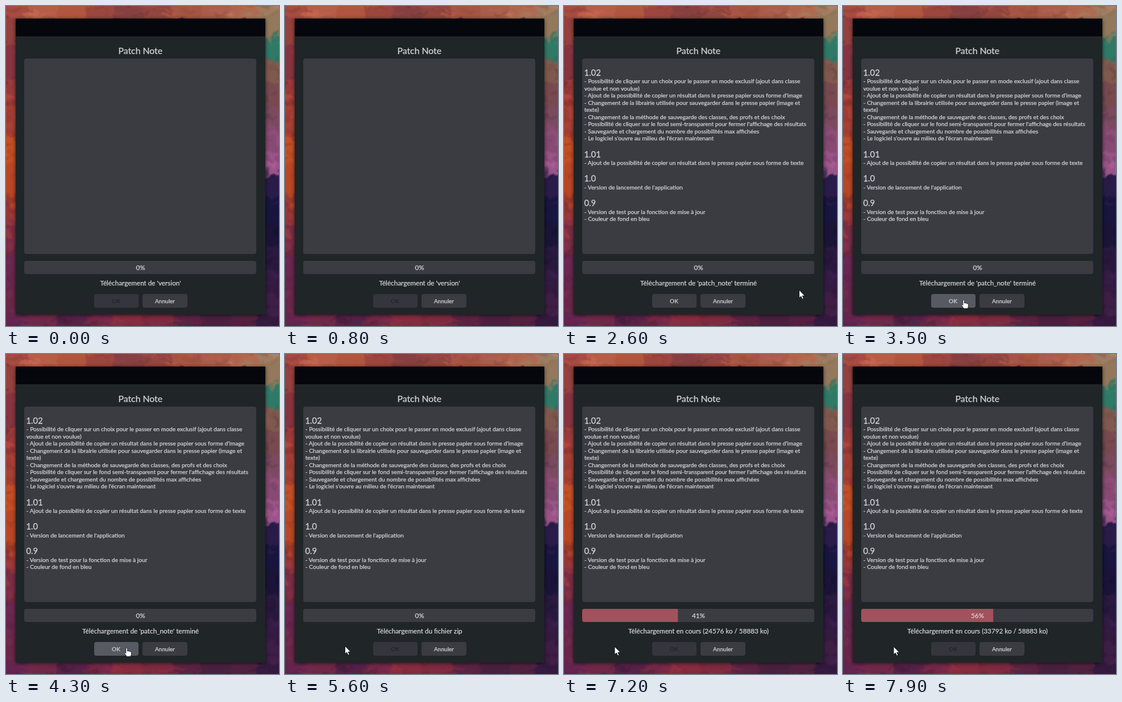
Write an HTML page that moves like this. It is 480x560 px and loops after 8000 ms.

```html
<!DOCTYPE html>
<html lang="fr">
<head>
<meta charset="utf-8">
<title>Patch Note</title>
<style>
  html, body { margin: 0; width: 100%; height: 100%; overflow: hidden; background: #5a2440; }
  svg { display: block; width: 480px; height: 560px; }
  filter { color-interpolation-filters: sRGB; }
  text { font-family: Lato, "Open Sans", sans-serif; fill: #d4d5d7; stroke: #d4d5d7; stroke-width: .25px; white-space: pre; }
  .mid { text-anchor: middle; }
  .title { font-size: 15.8px; }
  .label { font-size: 11.72px; }
  .head { font-size: 14.8px; }
  .body { font-size: 10.27px; }
  .btn { font-size: 10.1px; }
</style>
</head>
<body>
<svg viewBox="0 0 480 560" xmlns="http://www.w3.org/2000/svg">
  <defs>
    <filter id="paint" filterUnits="userSpaceOnUse" x="-20" y="-20" width="520" height="600">
      <feTurbulence type="fractalNoise" baseFrequency="0.06" numOctaves="3" seed="4"/>
      <feDisplacementMap in="SourceGraphic" scale="20" xChannelSelector="R" yChannelSelector="G"/>
      <feGaussianBlur stdDeviation=".8"/>
    </filter>
    <filter id="shadow" x="-5%" y="-5%" width="110%" height="110%">
      <feDropShadow dx="0" dy="1" stdDeviation="3" flood-color="#000" flood-opacity=".65"/>
    </filter>
    <clipPath id="barClip"><rect x="32" y="446" width="408" height="23" rx="4"/></clipPath>
  </defs>

  <g id="wall" filter="url(#paint)"></g>

  <g filter="url(#shadow)">
    <rect x="17" y="22" width="439" height="518" fill="#202528"/>
    <rect x="17" y="22" width="439" height="31" fill="#06070c"/>
  </g>

  <text class="mid title" x="236.3" y="84.3">Patch Note</text>
  <rect x="32" y="92" width="408" height="342" rx="4" fill="#3b3b42"/>
  <g id="notes"></g>

  <rect x="32" y="446" width="408" height="23" rx="4" fill="#3b3b42"/>
  <rect id="fill" x="32" y="446" height="23" fill="#a1525c" clip-path="url(#barClip)"/>
  <text id="percent" class="mid label" x="236.5" y="462"></text>
  <text id="status" class="mid label" x="236.5" y="489"></text>

  <rect id="okBox" x="155" y="504" width="78" height="24" rx="4"/>
  <text id="okText" class="mid btn" x="193.5" y="520">OK</text>
  <rect x="240" y="504" width="79" height="24" rx="4" fill="#3b3b42"/>
  <text class="mid btn" x="279.5" y="520">Annuler</text>

  <g id="cursor" stroke="#111" stroke-width=".9" fill="#fff" stroke-linejoin="round">
    <path id="arrow" d="M0 0V14L3.2 11L5.5 16L7.8 15L5.6 10.2H10Z"/>
    <path id="hand" d="M-.2 1.2Q1.5-.6 2.6 1.4V6Q4.4 4.8 5.2 6.3Q6.8 5.4 7.6 7Q9.6 6.6 9.6 8.6V11.5L8 15.5H1.5L-2.8 9.8Q-2.2 7.6-.2 9.4Z"/>
  </g>
</svg>
<script>
const LOOP = 8000;
const TOTAL = 58883;
const NS = 'http://www.w3.org/2000/svg';
const $ = id => document.getElementById(id);

function add(parent, tag, attrs, content) {
  const el = document.createElementNS(NS, tag);
  for (const key in attrs) el.setAttribute(key, attrs[key]);
  if (content) el.textContent = content;
  parent.appendChild(el);
  return el;
}

let seed = 7;
function random() {
  seed = (seed * 16807) % 2147483647;
  return seed / 2147483647;
}

// Wallpaper: painted strokes along the four visible edges
const edges = [
  { x: -15, y: -15, w: 510, h: 41,
    colors: ['#a84c42', '#b65d4a', '#b0553f', '#9c463e', '#86403f', '#93463f', '#a65443', '#a85c4b', '#b06a52', '#a07a5e'] },
  { x: -15, y: 532, w: 510, h: 43,
    colors: ['#642450', '#702848', '#552248', '#6d2643', '#872c3f', '#7c2a40', '#5a2342', '#48203f', '#50223f', '#33193d'] },
  { x: -15, y: 20, w: 37, h: 520,
    colors: ['#95413e', '#863540', '#993a3a', '#a84034', '#c44f26', '#b94726', '#963736', '#792d44', '#692750', '#682748'] },
  { x: 450, y: 12, w: 45, h: 528,
    colors: ['#94785c', '#2f7a66', '#80594e', '#784a50', '#7b4a5e', '#874a72', '#9a5488', '#2a1c4a', '#181540', '#1a1438', '#2a1a40', '#341c45', '#3e1e45'] }
];
const strokes = [];
for (const { x, y, w, h, colors } of edges) {
  const wide = w > h;
  const step = (wide ? w : h) / colors.length;
  const side = wide ? h : w;
  colors.forEach((fill, i) => add($('wall'), 'rect', wide
    ? { x: x + i * step, y, width: step + 1, height: side, fill }
    : { x, y: y + i * step, width: side, height: step + 1, fill }));
  for (let n = 0; n < 90; n++) {
    const u = random();
    const pick = Math.floor(u * colors.length + (random() - .5) * 1.2);
    const fill = colors[Math.max(0, Math.min(colors.length - 1, pick))];
    const cx = x + w * (wide ? u : random());
    const cy = y + h * (wide ? random() : u);
    const el = add($('wall'), 'ellipse', {
      cy, rx: 4 + random() * (wide ? 18 : 7), ry: 1.5 + random() * (wide ? 3 : 8),
      fill, opacity: .6, style: `filter:brightness(${(.8 + random() * .36).toFixed(2)})`
    });
    strokes.push({ el, cx, phase: random() * 6.28 });
  }
}

const releases = [
  ['1.02', 122, [
    "- Possibilité de cliquer sur un choix pour le passer en mode exclusif (ajout dans classe",
    "voulue et non voulue)",
    "- Ajout de la possibilité de copier un résultat dans le presse papier sous forme d'image",
    "- Changement de la librairie utilisée pour sauvegarder dans le presse papier (image et",
    "texte)",
    "- Changement de la méthode de sauvegarde des classes, des profs et des choix",
    "- Possibilité de cliquer sur le fond semi-transparent pour fermer l'affichage des résultats",
    "- Sauvegarde et chargement du nombre de possibilités max affichées",
    "- Le logiciel s'ouvre au milieu de l'écran maintenant"]],
  ['1.01', 264.5, ["- Ajout de la possibilité de copier un résultat dans le presse papier sous forme de texte"]],
  ['1.0', 307.4, ["- Version de lancement de l'application"]],
  ['0.9', 350.3, ["- Version de test pour la fonction de mise à jour", "- Couleur de fond en bleu"]]
];
for (const [version, y, lines] of releases) {
  add($('notes'), 'text', { class: 'head', x: 35.5, y }, version);
  lines.forEach((line, i) =>
    add($('notes'), 'text', { class: 'body', x: 35.7, y: y + 13.3 + i * 12.48 }, line));
}

// Interpolates [time, ...values] keys, optionally eased
function track(keys, t, ease = k => k) {
  const next = keys.findIndex(key => key[0] > t);
  if (next === 0) return keys[0].slice(1);
  if (next < 0) return keys[keys.length - 1].slice(1);
  const a = keys[next - 1], b = keys[next];
  const k = ease((t - a[0]) / (b[0] - a[0]));
  return a.slice(1).map((v, i) => v + (b[i + 1] - v) * k);
}
const smooth = k => k * k * (3 - 2 * k);

const NOTES_AT = 2200, CURSOR_AT = 2400, CLICK_AT = 4700, DOWNLOAD_AT = 5700;
const pointer = [[2400, 430, 490], [2600, 413.5, 497], [3500, 211, 514], [4800, 211, 514], [5600, 105.5, 511], [5900, 89, 512]];
const chunks = [[DOWNLOAD_AT, 0], [6500, 16], [7900, 33]];

function statusAt(t, ko) {
  if (t < 1000) return "Téléchargement de 'version'";
  if (t < NOTES_AT) return "Téléchargement de 'patch_note'";
  if (t < CLICK_AT) return "Téléchargement de 'patch_note' terminé";
  if (t < DOWNLOAD_AT) return "Téléchargement du fichier zip";
  return `Téléchargement en cours (${ko} ko / ${TOTAL} ko)`;
}

function draw(t) {
  for (const s of strokes) {
    s.el.setAttribute('cx', s.cx + 3 * Math.sin(t / LOOP * 2 * Math.PI + s.phase));
  }

  const ko = 1024 * Math.floor(track(chunks, t)[0] + .001);
  $('fill').setAttribute('width', Math.max(0, 408 * ko / TOTAL - 2));
  $('percent').textContent = Math.max(0, Math.floor((ko - 400) / TOTAL * 100)) + '%';
  $('status').textContent = statusAt(t, ko);
  $('notes').style.display = t < NOTES_AT ? 'none' : '';

  const [x, y] = track(pointer, t, smooth);
  const enabled = t >= NOTES_AT && t < CLICK_AT;
  const hover = enabled && t >= CURSOR_AT && x > 155 && x < 233 && y > 504 && y < 528;
  $('okBox').style.fill = hover ? '#575a61' : enabled ? '#3b3b42' : '#35363d';
  $('okText').style.fill = $('okText').style.stroke = enabled ? '#d4d5d7' : '#202428';
  $('cursor').style.display = t < CURSOR_AT ? 'none' : '';
  $('cursor').setAttribute('transform', `translate(${x} ${y})`);
  $('arrow').style.display = hover ? 'none' : '';
  $('hand').style.display = hover ? '' : 'none';
}

function frame() {
  draw(performance.now() % LOOP);
  requestAnimationFrame(frame);
}
frame();
</script>
</body>
</html>
```
